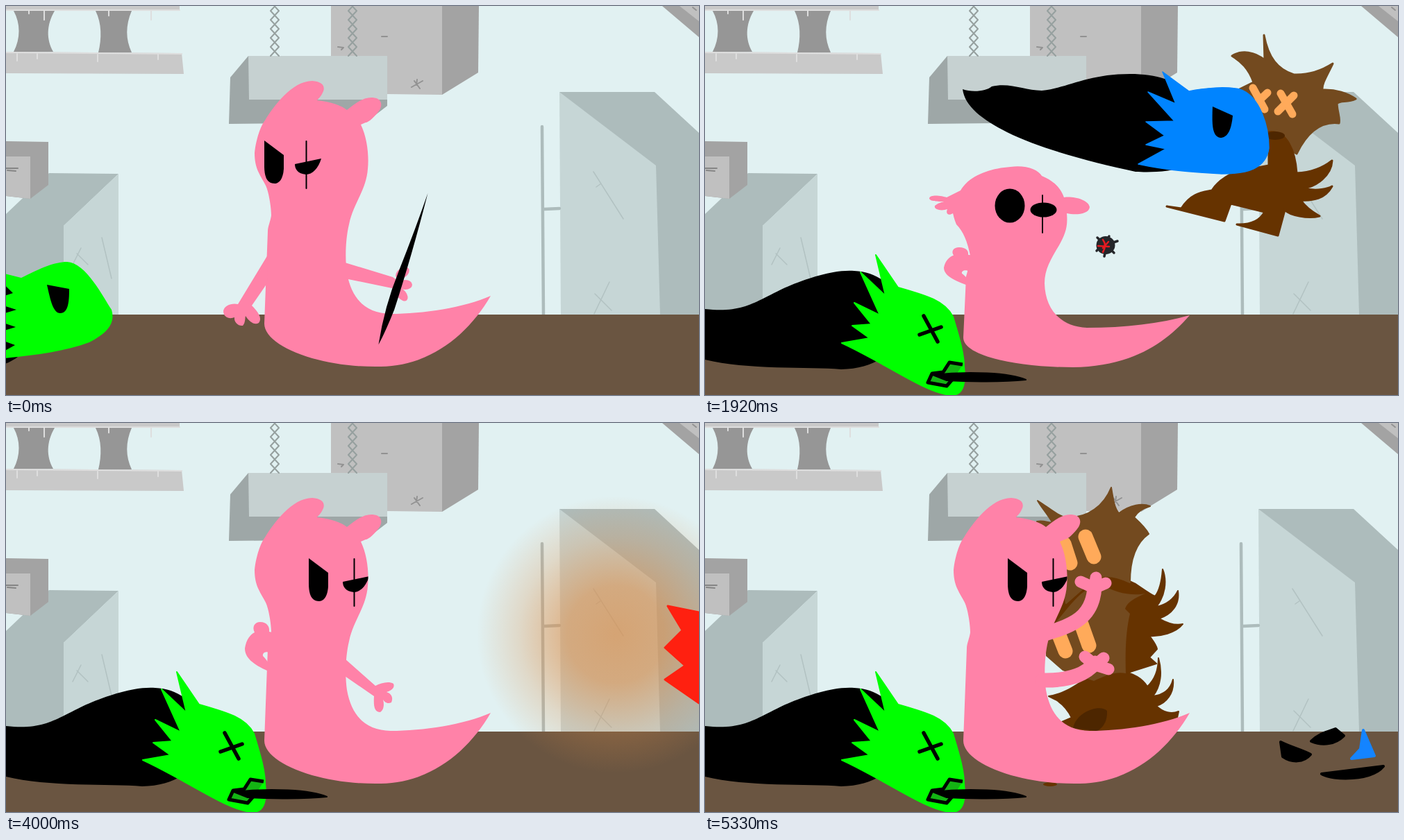
Animation of 998 by 561 pixels, one loop 5.5 s. Source, as an HTML page:

```html
<!DOCTYPE html>
<html lang="en">
<head>
<meta charset="utf-8">
<title>Workshop fight</title>
<style>
html, body { margin: 0; width: 100%; height: 100%; overflow: hidden; background: #e1f1f2; }
svg { display: block; width: 100vw; height: 100vh; }
</style>
</head>
<body>
<svg viewBox="0 0 998 561">
<clipPath id="face"><rect width="521.5" height="561"/></clipPath>
<g id="back"></g><g id="cast"></g>
</svg>
<script>
const PINK = '#ff82a8', GREEN = '#00ff00', BLUE = '#0084ff';
const TAN = '#734a1f', BROWN = '#663300', ORANGE = '#ffaa5a';

const shape = (d, fill = '#000', extra = '') => `<path d="${d}" fill="${fill}" ${extra}/>`;
const rim = (color, width) => `stroke="${color}" stroke-width="${width}" stroke-linejoin="round"`;
const poly = (points, fill, extra = '') => shape(`M${points}Z`, fill, extra);
const line = (d, color, width) =>
  `<path d="${d}" fill="none" stroke-linecap="round" ${rim(color, width)}/>`;
const oval = (x, y, rx, ry, fill = '#000') => `<ellipse cx="${x}" cy="${y}" rx="${rx}" ry="${ry}" fill="${fill}"/>`;
const group = (transform, content) => `<g transform="${transform}">${content}</g>`;
const mix = (a, b, u) => a + (b - a) * u;

function chain(x) {
  let a = `M${x - 6} -6`, b = `M${x + 6} -6`;
  for (let i = 1; i <= 6; i++) {
    const side = i % 2 ? 6 : -6, y = i * 13 - 6;
    a += `L${x + side} ${y}`;
    b += `L${x - side} ${y}`;
  }
  return line(a + b, '#96a09f', 2);
}

function backdrop() {
  const front = '#c6d6d6', side = '#adbcbc', box = '#c0c0c0', shade = '#a3a3a3', scratch = '#b2c2c2';
  return `<rect width="998" height="561" fill="#e1f1f2"/>` +
    poly('0 0 250 0 250 6 0 6', '#c9c9c9') +
    shape('M11 7C21 25 21 47 11 66H68C58 48 58 28 70 7ZM129 7C138 25 138 47 133 67H181C172 48 172 28 181 7Z', '#969696') +
    poly('0 66 253 68 256 98 0 97', '#c9c9c9') +
    line('M0 6H250M0 67L253 69M33 6V11M55 6V20M148 6V14M209 6V20M16 69V79M45 69V76M132 69V80M219 69V77', '#dedede', 2) +
    poly('0 300 62 241 162 242 83 317 83 445 0 445', side) +
    poly('83 317 162 242 162 445 83 445', front) +
    line('M138 334L152 393M96 373L108 349M102 357L118 373', scratch, 1.5) +
    poly('0 195 61 196 61 258 35 278 0 274', shade) +
    poly('0 217 35 217 35 278 0 274', box) +
    line('M0 234H17M2 237L14 238', '#858585', 2) +
    poly('468 0 628 0 628 128 468 126', box) +
    poly('628 0 681 0 680 96 628 128', shade) +
    line('M541 44H549M478 59L486 60 483 63M584 117L600 108M588 108L596 119M592 106L591 114', '#929292', 2) +
    poly('349 72 323 103 321 170 518 168 549 144 549 135', '#9ea7a7') +
    poly('349 72 549 72 549 135 350 135', '#c6d1d1') +
    chain(387) + chain(499) +
    poly('945 0 998 0 998 45', shade) + poly('970 0 998 0 998 22', box) +
    line('M989 2L994 6', '#929292', 2) +
    poly('797 124 934 124 998 183 998 445 936 445', side) +
    poly('797 124 936 230 942 445 799 445', front) +
    line('M846 239L889 307M850 261L857 256M869 398L847 444M848 415L872 439', scratch, 1.5) +
    line('M772 174L774 445M775 293L797 292', side, 4.5) +
    `<rect y="445" width="998" height="116" fill="#6a5541"/>`;
}

// Pink fighter
const BODY = 'M373 165C385 145 412 108 441 108C458 109 460 118 456 125C453 132 448 135 448 136C468 138 484 144 491 150C500 143 513 131 528 132C540 133 543 141 538 150C531 160 522 168 518 168L511 171C520 190 523 215 521 235C519 265 500 285 494 315C489 335 488 365 491 385C498 425 520 443 554 444C600 444 660 435 698 418C665 475 610 519 540 520C450 522 372 490 372 458L377 325C377 318 381 310 382 302C382 290 378 265 373 257C366 243 358 235 358 212C360 192 367 172 373 165Z';
const DUCKED = 'M368 266C380 245 410 234 440 232C462 229 480 236 485 245C502 252 512 262 517 276C530 274 552 279 554 290C553 300 535 302 521 299C523 320 518 330 510 345C498 365 489 380 489 400C490 440 515 463 550 464C605 464 655 458 698 446C660 490 610 520 530 521C450 521 372 505 372 478L376 390C380 378 382 362 382 360C378 340 372 325 362 315C358 305 358 302 357 299C351 303 346 300 349 293C341 296 329 294 331 288C336 284 341 283 344 282C336 282 323 282 323 277C325 271 342 274 348 276Z';
const RAISED_ARM = 'M378 358C355 348 344 338 344 325C346 312 352 305 358 302C354 294 358 287 366 287C376 287 380 294 379 301L384 302V330L380 332C374 328 369 332 370 336C374 340 377 344 378 347Z';
const LOW_ARM = 'M377 359L334 430C325 428 314 432 313 440C313 449 322 452 329 449C328 456 335 462 341 461C345 457 344 450 345 447C350 455 358 461 364 457C370 450 362 440 354 432L376 400Z';
const REACH = 'M512 263L540 256C540 248 543 236 549 235C557 236 556 244 554 250C560 246 569 247 569 254C569 260 564 262 562 262C570 264 574 269 571 275C564 279 555 272 549 269L505 283Z';
const THROWN = 'M488 340L532 379C540 375 551 372 558 376C561 383 552 387 548 388C555 390 558 396 555 403C549 406 545 402 543 399C545 406 544 414 539 417C531 417 529 410 530 394L488 365Z';
const STICK = shape('M-115 0Q-20 -6 60 -6Q92 -4 115 0Q60 9 5 5Q-60 1 -115 0Z');

const angryEyes = (left, right) => `<g clip-path="url(#face)">` +
  group(`translate(${left})`, shape('M372 194L400 215V235C399 250 393 256 387 256C375 256 372 245 372 230Z')) +
  group(`translate(${right})`, shape('M416 228L454 220C450 234 441 243 432 243C420 242 416 235 416 228Z') + line('M432.5 195V263', '#000', 2)) + '</g>';
const roundEyes = oval(431, 214, 21.5, 33) + oval(479.5, 222.5, 19, 14.5) + line('M478.5 193V267', '#000', 1.8);
const duckedEyes = oval(439, 288, 21.5, 24.5) + oval(487.5, 294, 19, 10.5) + line('M486 273V327', '#000', 1.8);

const HEIGHT = { 18: .95, 19: .82, 28: .85, 29: .97, 30: 1.026, 31: 1.01 };

function pink(k) {
  if (k >= 20 && k < 28)
    return group('translate(0 127) scale(1 .77)', shape(RAISED_ARM, PINK)) + shape(DUCKED, PINK) + duckedEyes;
  let out = shape(BODY, PINK);
  if (k < 3) out += shape(LOW_ARM, PINK);
  else if (k < 62) out += shape(RAISED_ARM, PINK);
  if (k < 2) out += poly('488 370 557 391 572 402 556 407 488 393', PINK) + group('rotate(-35 571 385)', oval(571, 385, 11, 7, PINK)) +
    oval(575, 402, 10, 7, PINK) + group('rotate(50 570 416)', oval(570, 416, 11, 6.5, PINK));
  if (k >= 30 && k < 42) {
    const turn = 35 * Math.min(1, Math.max(0, (k - 35) / 4));
    out += group(`rotate(${turn} 500 275)`, shape(REACH, PINK) + (k >= 34 ? bomb(553, 258) : ''));
  } else if (k >= 42 && k < 62) out += shape(THROWN, PINK);
  if (k >= 62) out += line('M490 304C530 292 559 280 561 236M486 371C530 372 550 360 562 346', PINK, 21) +
    line('M561 238L541 229M561 238L563 223M561 238L577 231M562 349L547 337M562 349L574 339M562 349L581 355', PINK, 17);
  out += k < 19 ? angryEyes(0, 0) : k < 37 ? roundEyes : angryEyes('64 1', '69 1');
  const s = HEIGHT[k] || 1;
  return group(`translate(0 ${521 * (1 - s)}) scale(1 ${s})`, out);
}

// Green attacker
const SNAKE = shape('M-320 437H0C70 445 80 415 150 393C180 383 200 381 215 382C260 384 288 420 285 455C282 495 250 523 196 524C150 520 60 525 0 510H-320Z');
const LUNGE = shape('M-25 380L22 392C50 378 70 369 88 369C115 370 140 420 152 438C157 455 150 470 120 485C80 500 30 505 -25 510L13 489L-25 475L14 463L-25 450L15 438L-25 425L10 414Z', GREEN) +
  shape('M59 402L91 408C91 425 90 443 78 443C68 443 64 425 59 402Z');
const DIZZY = shape('M187 318C190 290 205 280 256 267C285 258 305 268 309 310C312 350 300 400 289 451L269 409L261 436L251 407L231 436L233 394L188 431L208 390L160 409L190 372C188 350 186 335 187 318Z', GREEN, rim(GREEN, 1.5)) +
  line('M219 333C226 343 248 346 247 334C243 310 226 301 217 307C212 319 222 332 232 335C242 335 239 318 229 318C222 322 228 330 234 326', '#000', 5) +
  shape('M256 268L260 290L272 289L281 311L297 318L295 300L275 276L268 264', '#14b414', rim('#000', 4.5));
const DEAD = shape('M246 359L278 406C320 418 345 425 357 448C365 475 373 500 373 520C376 548 370 561 355 561C320 560 260 515 197 486L237 479L212 461L240 459L215 428L252 446L224 384L260 418Z', GREEN, rim(GREEN, 2)) +
  line('M315 447L335 484M309 474L340 463', '#000', 5.5) +
  shape('M371 517L352 514L343 528L327 530L321 543L348 548L361 533', '#14b414', rim('#000', 5)) +
  shape('M328 532C380 526 440 529 462 539C430 542 380 542 348 540Z', '#000', rim('#000', 2));

function green(k) {
  if (k < 4) {
    const dx = [0, 30, 80, 130][k];
    return group(`translate(${dx - 240})`, SNAKE) + group(`translate(${dx})`, LUNGE);
  }
  if (k > 11) return SNAKE + DEAD;
  const tilt = { 4: 14, 5: 7, 10: 15, 11: 32 }[k] || 0;
  return SNAKE + group(`rotate(${tilt} 240 440)`, DIZZY);
}

const SWING = [[572, 379, 108], [560, 360, 122], [500, 340, 150], [450, 345, 175], [440, 340, 200], [445, 335, 230],
  [455, 332, 270], [470, 335, 300], [478, 235, 318], [434, 200, 343], [395, 235, 390], [370, 370, 460]];
const stick = k => k < SWING.length ? group(`translate(${SWING[k][0]} ${SWING[k][1]}) rotate(${SWING[k][2]})`, STICK) : '';

// Bomb
const bomb = (x, y) => group(`translate(${x} ${y})`,
  oval(0, 0, 13.5, 13, '#25262a') +
  line('M-9 -8L-12 -11M4 -11L5 -13M11 -4L17 -6M9 8L12 11M-1 12L-2 16M-11 6L-13 8', '#25262a', 3.5) +
  line('M-11 1L5 2M-4 -8Q2 0 -4 10M4 -5L-4 4', '#e51a20', 2.5));

function looseBomb(k) {
  if (k === 22) return bomb(600, 290);
  if (k >= 23 && k < 34) {
    const u = Math.max(0, k - 27) / 5;
    return bomb(mix(577, 565, u), mix(345, 307, u));
  }
  const flight = { 42: [600, 325], 43: [720, 275], 44: [848, 300] }[k];
  return flight ? bomb(...flight) : '';
}

// Blue snake carrying a hedgehog
const RAID =
  shape('M805 42C811 75 825 92 848 99C872 100 890 92 904 83C896 100 888 112 889 121C908 120 926 126 937 134C925 140 914 135 910 141C911 155 915 162 913 169C888 166 868 180 852 213L810 190L760 125L790 110C783 90 772 80 759 72C773 63 792 66 806 78Z', TAN, rim(TAN, 3)) +
  line('M789 118L806 149M810 125L792 142M829 126L846 156M848 129L825 152', ORANGE, 11) +
  shape('M812 182C838 178 850 210 852 241C878 240 893 231 903 223C902 245 880 260 862 263C882 268 898 263 903 260C893 278 876 281 858 280C866 292 878 299 885 303C868 307 842 302 835 294L825 331L766 315C788 316 800 308 806 297L757 285L748 310L665 289L686 292C700 270 715 269 730 266C740 250 760 240 770 238L812 230Z', BROWN, rim(BROWN, 3)) +
  oval(821, 187, 14, 6, '#4d2600') +
  shape('M371 120C385 125 405 123 413 116C440 110 460 122 485 122C520 119 550 98 612 98C650 98 680 108 700 125V230C670 240 640 240 620 239C560 226 485 207 435 182C400 164 374 145 371 120Z') +
  shape('M659 95L697 123C720 118 750 116 770 120C800 130 812 175 812 205C808 235 780 242 745 242C710 240 670 238 624 228L664 206L635 200L662 187L635 167L676 166L638 124L678 141Z', BLUE, rim(BLUE, 1.5)) +
  shape('M731 145L760 158C758 180 752 190 742 190C730 188 730 170 731 145Z');

function raid(k) {
  const u = k - 23;
  return u < -5 || u > 2 ? '' : group(`translate(${231 * u} ${45 * u * u + 46 * u})`, RAID);
}

// Captured hedgehogs
const PAIR =
  shape('M560 225C590 215 605 225 620 232C632 240 640 246 648 250C656 240 658 225 659 211C666 228 662 250 650 265C665 262 676 253 681 242C684 262 672 276 654 282C668 290 680 292 688 290C678 303 655 308 640 307C645 314 650 320 651 326L640 338L650 347L606 361L500 335V255Z', BROWN, rim(BROWN, 2)) +
  shape('M585 93C588 112 590 124 596 130C612 118 630 115 641 120C630 123 622 129 618 136C630 147 636 154 639 160C622 172 612 195 612 230C585 217 570 220 560 225L520 260L500 150C485 150 478 145 478 142C490 140 495 145 500 143C492 130 484 121 479 112C495 122 508 134 520 136C552 138 575 118 585 93Z', TAN, rim(TAN, 2)) +
  shape('M495 394C525 390 545 368 560 363C575 357 590 357 600 358C622 362 632 372 637 380C648 370 653 355 653 339C659 360 656 380 645 394C662 392 671 382 674 370C676 390 664 404 650 408C660 418 672 420 682 416L680 425L655 432C600 446 560 446 531 441L514 431L528 425Q520 408 505 399Z', BROWN, rim(BROWN, 2)) +
  shape('M491 305C525 265 540 238 570 232C590 245 615 250 634 246C620 252 608 258 605 268L612 275C606 300 605 330 606 361C590 358 575 365 560 372L515 357L491 336Z', TAN) +
  shape('M530 440C535 415 570 405 579 415Q580 435 565 444Z', '#4d2600') +
  oval(497, 521, 10, 3, BROWN) +
  line('M548 164L560 193M517 174L526 202M542 290L553 321M510 306L519 329', ORANGE, 21);

function pair(k) {
  const u = 64 - k;
  return k < 60 ? '' : group(`translate(${Math.max(0, u) * 105} ${-Math.max(0, u) * 28})`, PAIR);
}

// Explosion and falling shards
function blast(k) {
  if (k < 48 || k > 51) return '';
  const [r, alpha] = [[200, .68], [240, .8], [230, .5], [215, .22]][k - 48];
  const stops = [[0, 1], [.35, .88], [.7, .35], [1, 0]].map(([at, a]) =>
    `<stop offset="${at}" stop-color="#dc8c46" stop-opacity="${a * alpha}"/>`).join('');
  const star = k < 50 ? group(`translate(${-60 * (k - 48)})`,
    poly('953 264 974 299 949 324 978 350 949 370 998 404 1200 440 1200 300 998 273', '#ff2010', rim('#ff2010', 3))) : '';
  return `<radialGradient id="glow">${stops}</radialGradient>${oval(878, 305, r, r, 'url(#glow)')}${star}`;
}

// path at rest, rest centre, airborne centre, airborne turn
const SHARDS = [
  ['M873 459C885 447 898 445 908 441L920 451C908 463 890 466 873 459Z', 896, 453, 903, 343, -54],
  ['M888 506L977 495C960 516 905 516 888 506Z', 933, 504, 938, 418, 174],
  ['M829 460C845 468 862 472 872 478C862 490 845 490 832 481Z', 850, 474, 995, 362, -8],
  ['M948 443L964 480L931 484L944 470Z', 948, 464, 1040, 250, 120],
];

function shards(k) {
  if (k < 50) return '';
  return SHARDS.map(([d, x, y, ax, ay, turn], i) => {
    const u = Math.min(1, Math.max(0, (k - 52) / 6)), out = Math.max(0, 52 - k);
    const px = mix(ax, x, u) + out * 55, py = mix(ay, y, u * u) - out * 12;
    const color = i === 3 ? '#1484ff' : '#000';
    return group(`translate(${px} ${py}) rotate(${turn * (1 - u)}) translate(${-x} ${-y})`, shape(d, color, rim(color, 4)));
  }).join('');
}

const cast = document.getElementById('cast');
document.getElementById('back').innerHTML = backdrop();
let shown = -1;

function tick(now) {
  const k = Math.floor((now % 5500 + 4) * 12 / 1000) % 66;
  if (k !== shown) {
    shown = k;
    cast.innerHTML = [blast, pair, raid, pink, looseBomb, green, stick, shards].map(draw => draw(k)).join('');
  }
  requestAnimationFrame(tick);
}
tick(performance.now());
</script>
</body>
</html>
```
